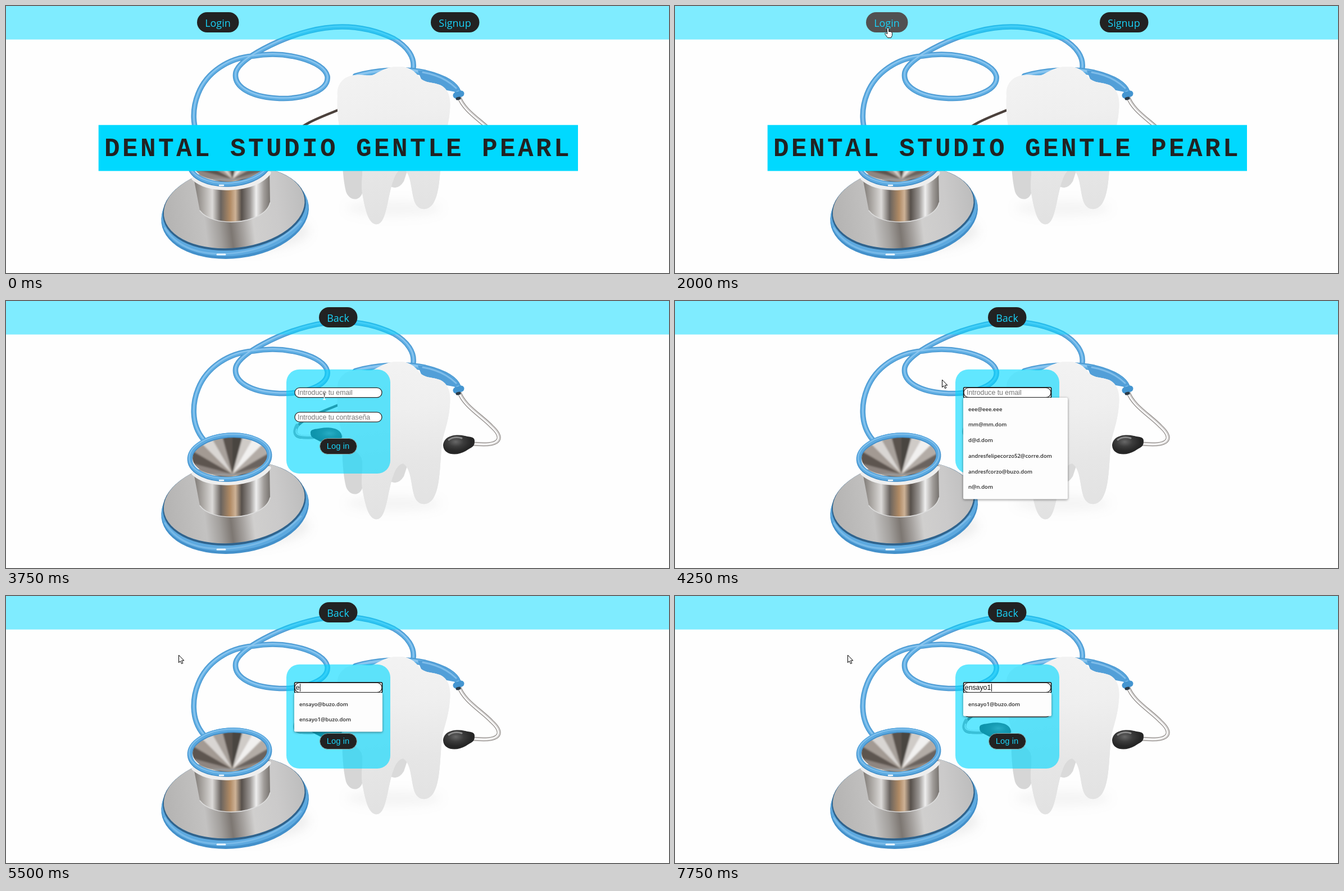
An HTML page that plays this animation: 1180 by 475 pixels, repeating every 8000 ms.

```html
<!DOCTYPE html>
<html lang="es">
<head>
<meta charset="utf-8">
<title>Clinic login</title>
<style>
  html, body { margin: 0; width: 100%; height: 100%; overflow: hidden; background: #fefefe; }
  svg { display: block; }
  path, ellipse { stroke-linecap: round; }
  .nav { font: 18px "Open Sans", "Noto Sans", sans-serif; fill: #19d3f8; text-anchor: middle; }
  .field { font: 12.3px "Liberation Sans", Arial, sans-serif; fill: #757575; }
  .title { font: bold 46px "Liberation Mono", monospace; letter-spacing: 4.4px; fill: #222; }
  #list text { font: 600 9.5px "Open Sans", "Noto Sans", sans-serif; fill: #2b2b2b; }
  #list rect { filter: drop-shadow(0 1px 2px #0007); }
</style>
</head>
<body>
<svg width="1180" height="475" viewBox="0 0 1180 475">
  <defs>
    <linearGradient id="tooth" x2=".1" y2="1">
      <stop stop-color="#f3f3f3"/><stop offset=".35" stop-color="#efefef"/>
      <stop offset=".7" stop-color="#e6e6e6"/><stop offset="1" stop-color="#e2e2e2"/>
    </linearGradient>
    <linearGradient id="sideShade">
      <stop stop-color="#aaa" stop-opacity=".35"/><stop offset=".2" stop-color="#bbb" stop-opacity="0"/>
      <stop offset=".75" stop-color="#bbb" stop-opacity="0"/><stop offset="1" stop-color="#aaa" stop-opacity=".3"/>
    </linearGradient>
    <linearGradient id="body">
      <stop stop-color="#77736f"/><stop offset=".1" stop-color="#a19d99"/><stop offset=".25" stop-color="#dcdad8"/>
      <stop offset=".36" stop-color="#6a645f"/><stop offset=".48" stop-color="#b08a64"/><stop offset=".55" stop-color="#cdb296"/>
      <stop offset=".63" stop-color="#57504b"/><stop offset=".74" stop-color="#9a9693"/><stop offset=".82" stop-color="#eee"/>
      <stop offset=".92" stop-color="#a09c99"/><stop offset="1" stop-color="#77736f"/>
    </linearGradient>
    <linearGradient id="plate">
      <stop stop-color="#b4b3b2"/><stop offset=".28" stop-color="#c3c2c1"/><stop offset=".38" stop-color="#a29f9c"/>
      <stop offset=".46" stop-color="#7d7772"/><stop offset=".54" stop-color="#a5a19e"/>
      <stop offset=".62" stop-color="#d0cfce"/><stop offset=".8" stop-color="#cbcaca"/><stop offset="1" stop-color="#bdbdbd"/>
    </linearGradient>
    <radialGradient id="bulb" cx=".4" cy=".35"><stop stop-color="#686868"/><stop offset=".5" stop-color="#3c3c3c"/><stop offset="1" stop-color="#262626"/></radialGradient>
    <filter id="soft" x="-30%" y="-60%" width="160%" height="220%"><feGaussianBlur stdDeviation="9"/></filter>
    <filter id="smooth"><feGaussianBlur stdDeviation="1.5"/></filter>
    <clipPath id="cone"><ellipse cx="399" cy="276" rx="67" ry="35" transform="rotate(-4 399 276)"/></clipPath>
    <path id="tube" d="M352 247C327 218 333 178 342 156C357 118 396 92 440 89C500 79 566 98 572 125C576 154 520 167 480 164C436 161 404 144 409 118C416 92 490 57 538 45C600 29 650 39 690 58C716 73 727 92 725 110"/>
    <path id="yoke" d="M622 125C652 116 704 110 746 119C779 127 803 139 806 158"/>
    <path id="wire" d="M806 161C815 187 846 204 864 223C887 244 878 255 850 255L828 254"/>
    <path id="wireLeft" d="M594 184C562 197 519 212 515 230C512 244 525 244 546 242"/>
    <path id="earbud" d="M778 257C779 240 799 236 817 240C825 242 835 241 834 250C834 260 828 260 818 267C803 276 779 275 778 257Z"/>
  </defs>

  <g id="photo" fill="none">
    <g filter="url(#soft)" fill="#999">
      <ellipse cx="420" cy="400" rx="120" ry="36" opacity=".15"/><ellipse cx="690" cy="360" rx="85" ry="14" opacity=".1"/>
    </g>
    <g id="blue"></g>
    <use href="#wireLeft" stroke="#4b413c" stroke-width="4.5"/>
    <path d="M518 222C511 236 513 244 546 242" stroke="#999" stroke-width="7"/>
    <path d="M517 228C514 238 520 240 544 240" stroke="#eee" stroke-width="2"/>
    <use href="#earbud" fill="url(#bulb)" transform="matrix(-1 0 0 .86 1376 20)"/>
    <use href="#wire" stroke="#8d8986" stroke-width="7"/>
    <use href="#wire" stroke="#d5d2d1" stroke-width="5"/>
    <use href="#wire" stroke="#fff" stroke-width="2" x="-1"/>
    <path d="M801 159l9-3" stroke="#4495d0" stroke-width="11"/>
    <path d="M803 165l4-1" stroke="#2a3a48" stroke-width="5"/>
    <use href="#earbud" fill="url(#bulb)"/>
    <path d="M788 247q10-7 23-3" stroke="#888" stroke-width="3"/>

    <path d="M684 321q14 7 24-9l8-24h-25z" fill="#dadada"/>
    <path d="M597 225C600 254 596 290 605 330C611 347 629 348 634 333L642 270Z" fill="#d6d6d6"/>
    <path id="crown" fill="url(#tooth)" d="M590 160C588 139 601 124 622 123C636 121 645 126 655 122C672 113 680 108 697 108C716 107 727 115 735 126C744 138 761 135 774 141C787 148 792 162 790 184C788 215 780 230 776 252C772 292 773 330 761 350C752 365 735 365 728 350C720 330 723 300 707 289C690 291 685 325 679 352C673 379 668 390 657 388C643 385 638 354 634 333C631 310 637 296 633 280C625 262 603 264 597 230C590 205 589 181 590 160Z"/>
    <use href="#crown" fill="url(#sideShade)"/>

    <g transform="rotate(-7 407 365)">
      <ellipse cx="407" cy="370" rx="132" ry="79" fill="#4390ca"/>
      <ellipse cx="407" cy="367" rx="131" ry="77" fill="#5da9df"/>
      <ellipse cx="407" cy="360" rx="128" ry="74" fill="#2f638d"/>
      <ellipse cx="407" cy="358" rx="126" ry="72" fill="url(#plate)"/>
    </g>
    <path d="M283 395Q312 442 388 441Q475 437 525 383" stroke="#79bae8" stroke-width="3"/>
    <path d="M376 442h14" stroke="#eef8ff" stroke-width="3"/>
    <path d="M333 300L345 364C357 380 383 385 407 384C441 382 466 368 470 350L469 292Z" fill="url(#body)"/>
    <path d="M345 364C357 380 383 385 407 384C441 382 466 368 470 350" stroke="#ddd" stroke-width="1.5"/>
    <path d="M334 307Q355 326 400 324Q449 321 468 297" stroke="#eee" stroke-width="7"/>
    <g clip-path="url(#cone)"><g id="wedges" filter="url(#smooth)"></g></g>
    <g transform="rotate(-4 398 277)">
      <ellipse cx="398" cy="278" rx="71" ry="39" stroke="#4390ca" stroke-width="9"/>
      <ellipse cx="398" cy="277" rx="71" ry="39" stroke="#5caae1" stroke-width="7"/>
      <ellipse cx="398" cy="276" rx="72" ry="39" stroke="#8cc6ee" stroke-width="1.5"/>
    </g>
    <path d="M380 319h7" stroke="#fff" stroke-width="2.5"/>
  </g>

  <rect width="1180" height="59.6" fill="#00d9ff" fill-opacity=".5"/>

  <g id="home">
    <rect id="login" x="340" y="11" width="74.5" height="36" rx="18"/>
    <text class="nav" x="377" y="36.5">Login</text>
    <rect x="756" y="11" width="86.5" height="36" rx="18" fill="#222"/>
    <text class="nav" x="799" y="36.5">Signup</text>
    <rect x="164.7" y="211.7" width="853.3" height="81.8" fill="#00d9ff"/>
    <text class="title" x="175" y="267">DENTAL STUDIO GENTLE PEARL</text>
  </g>

  <g id="form">
    <rect x="557" y="11" width="68.5" height="36" rx="18" fill="#222"/>
    <text class="nav" x="591" y="36.5">Back</text>
    <rect x="499" y="121.7" width="185" height="185.3" rx="23" fill="#00d9ff" fill-opacity=".62"/>
    <rect id="ring" x="513.6" y="153.8" width="156" height="18.2" rx="2" fill="#fff" stroke="#111" stroke-width="1.6"/>
    <g fill="#fff" stroke="#2c2c2c" stroke-width="1.3">
      <rect x="514" y="154.3" width="155" height="17.4" rx="8.7"/>
      <rect x="514" y="197.8" width="155" height="17.4" rx="8.7"/>
    </g>
    <text class="field" x="519" y="167.3" id="hint">Introduce tu email</text>
    <text class="field" x="519" y="210.8">Introduce tu contraseña</text>
    <text class="field" x="515.8" y="167.3" id="typed" style="fill:#111"></text>
    <path id="caret" stroke="#111"/>
    <rect x="558.5" y="244.5" width="66" height="28" rx="14" fill="#222" stroke="#8aa" stroke-width="1"/>
    <text class="nav" x="591" y="263" style="font:14.8px 'Liberation Sans',Arial,sans-serif">Log in</text>
    <g id="list"></g>
  </g>

  <g id="arrow" stroke="#000" fill="#fff"><path d="M.5.5V13.5L3.4 10.8L5.6 15.5L7.8 14.5L5.6 9.9H9.5Z"/></g>
  <path id="hand" fill="#fff" stroke="#111" d="M377.5 39.5q1.5-2 3 0v6q4-1 6 2v5l-2 4h-6l-5-7q0-2 2-1l2 1z"/>
  <g id="beam" fill="none">
    <path d="M566.5 164v7" stroke="#333"/><path d="M566.5 171v4m-2 .3h4" stroke="#fff" stroke-width="1.3"/>
  </g>
</svg>

<script>
const $ = id => document.getElementById(id);
const show = (id, on) => $(id).style.display = on ? "" : "none";
const STEP = 250, LOOP = 8000, USER = "ensayo1";
const MAILS = ["eee@eee.eee", "mm@mm.dom", "d@d.dom", "andresfelipecorzo52@corre.dom", "andresfcorzo@buzo.dom", "n@n.dom"];
const MATCHES = ["ensayo@buzo.dom", "ensayo1@buzo.dom"];

// Glossy tubing: the same curves stroked from dark edge to bright core
const gloss = [["#4c99d1", 0, 0], ["#5faee3", -3, 0], ["#8ac5ef", -7, -1]];
$("blue").innerHTML = ["tube", "yoke"].map((id, i) => gloss.map(([color, d, dy]) =>
  `<use href="#${id}" y="${dy}" stroke="${color}" stroke-width="${9.5 + i * 1.5 + d}"/>`).join("")).join("") +
  '<path d="M735 116Q780 118 806 149L798 151Q770 147 742 134Z" fill="#529fd8" stroke="#529fd8" stroke-width="3"/>' +
  '<path d="M742 118Q778 124 801 146" stroke="#7fbdea" stroke-width="3"/>';

// Polished bell: a fan of shades around the apex
const shades = ["#8f8681", "#5d5550", "#a39a93", "#d9d6d3", "#a8a19b", "#5a524e", "#4a4440", "#cfcbc7", "#f1f0ef", "#b3aca6", "#6b635e", "#8e8781"];
$("wedges").innerHTML = shades.map((color, i) => {
  const at = j => { const a = Math.PI * (1 + j / shades.length); return `${403 + 110 * Math.cos(a)} ${308 + 110 * Math.sin(a)}`; };
  return `<path d="M403 308L${at(i)}L${at(i + 1.05)}Z" fill="${color}"/>`;
}).join("") + '<path d="M325 307h150v12h-150z" fill="#999"/>';

function path(from, to, u) {
  const e = u * (2 - u);
  return from.map((v, i) => v + (to[i] - v) * e);
}

function pointer(k) {
  if (k < 9) return path([541, 379], [374, 40], Math.min((k - 1) / 4, 1));
  if (k < 11) return [374, 38];
  if (k < 17) return path([374, 38], [564, 158], (k - 10) / 5);
  return path([475, 140], [307, 105], Math.min((k - 17) / 2, 1));
}

function fillList(mails, width) {
  const height = 14 + 27.75 * mails.length;
  $("list").innerHTML = mails.length ? `<rect x="513" y="172" width="${width}" height="${height}" rx="2.5" fill="#fdfdfd"/>` +
    mails.map((m, i) => `<text x="522" y="${195.6 + 27.75 * i}">${m}</text>`).join("") : "";
}

function render(k) {
  const focused = k >= 17;
  show("home", k < 9);
  show("form", k >= 9);
  show("ring", focused);
  $("login").setAttribute("fill", ["#222", "#333", "#444", "#515151"][Math.max(0, Math.min(k - 5, 3))]);

  const count = k < 21 ? 0 : k < 23 ? 1 : k < 28 ? k - 21 : 6;
  const text = USER.slice(0, Math.min(count, 6) + (k >= 29));
  show("hint", !text);
  $("typed").textContent = text;
  show("caret", text);
  if (text) $("caret").setAttribute("d", `M${Math.round(516 + $("typed").getComputedTextLength()) + .5} 156.5v13`);

  if (k >= 17 && k < 21) fillList(MAILS, 186);
  else fillList(k < 22 ? [] : MATCHES.slice(k >= 30 ? 1 : 0), 157);

  const hand = k >= 6 && k < 9, beam = k >= 15 && k < 17;
  show("hand", hand);
  show("beam", beam);
  show("arrow", k > 0 && !hand && !beam);
  $("arrow").setAttribute("transform", `translate(${pointer(k).map(Math.round)})`);
}

let last = -1;
function tick() {
  const k = Math.floor(performance.now() % LOOP / STEP);
  if (k !== last) render(last = k);
  requestAnimationFrame(tick);
}
tick();
</script>
</body>
</html>
```
